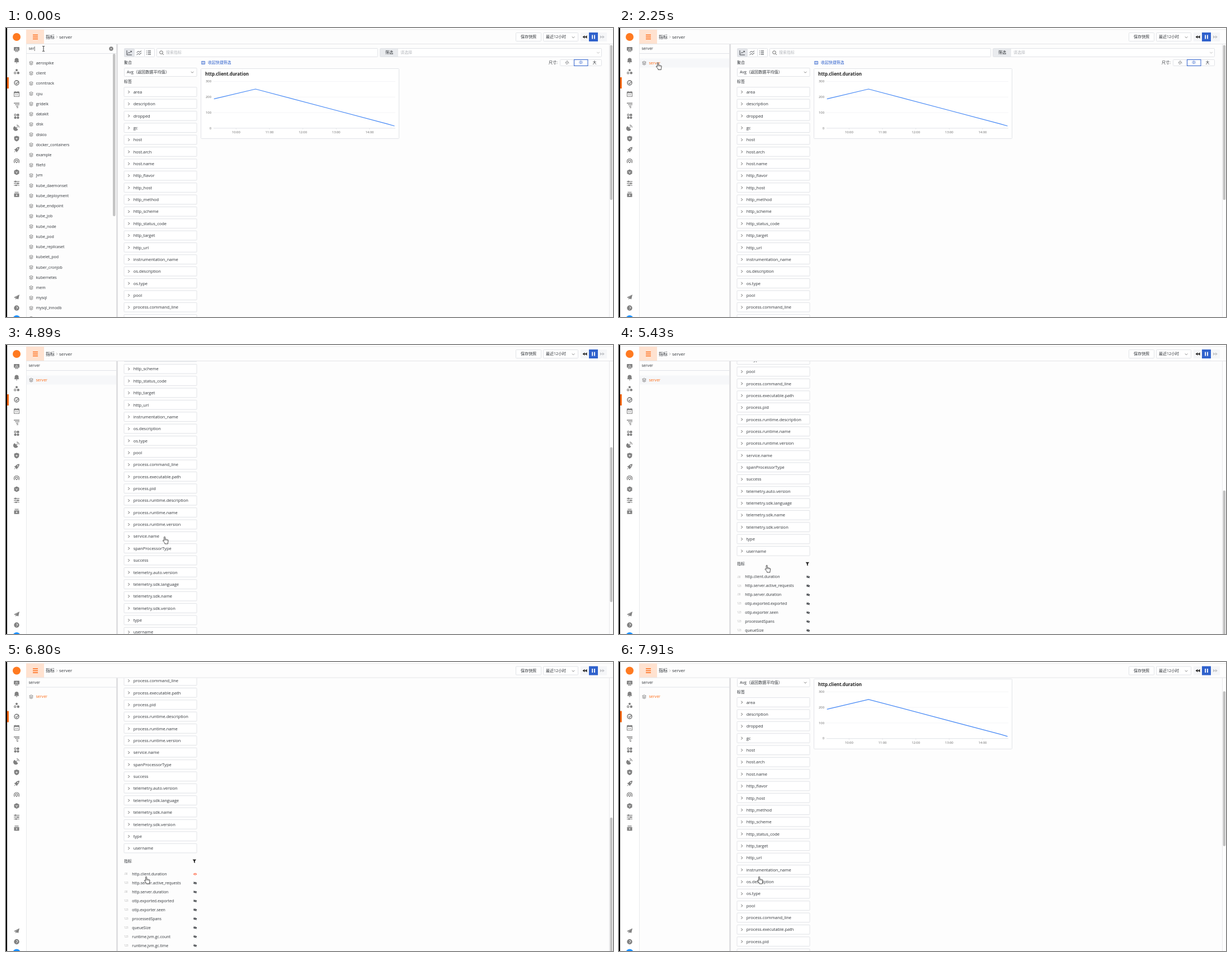
These frames come from a looping animation (1085 by 516 pixels, 8000 ms). An HTML page:

```html
<!DOCTYPE html>
<html lang="zh">
<head>
<meta charset="utf-8">
<title>Metrics explorer</title>
<style>
html, body { margin: 0; width: 100%; height: 100%; overflow: hidden; background: #fff; }
svg { display: block; width: 100vw; height: 100vh; font-family: "Open Sans", "Noto Sans CJK SC", "Noto Sans CJK", sans-serif; }
text { white-space: pre; }
</style>
</head>
<body>
<svg id="stage" viewBox="0 0 1085 516" xmlns="http://www.w3.org/2000/svg"></svg>
<script>
const INK = '#2f3338', GREY = '#808080', PALE = '#b4b7bc', LINE = '#e1e3e7', BLUE = '#2f61cc', ORANGE = '#ff6a13';
const LOOP = 8000;

// Shape helpers; text is placed by its vertical centre.
const text = (x, y, s, size = 7, fill = INK, extra = '') =>
  `<text x="${x}" y="${y + size * .35}" font-size="${size}" fill="${fill}" ${extra}>${s}</text>`;
const rect = (x, y, w, h, fill, extra = '') =>
  `<rect x="${x}" y="${y}" width="${w}" height="${h}" fill="${fill}" ${extra}/>`;
const box = (x, y, w, h, fill = '#fff', stroke = LINE) => rect(x, y, w, h, fill, `stroke="${stroke}" rx="1"`);
const path = (d, stroke = INK, width = 1, fill = 'none') =>
  `<path d="${d}" stroke="${stroke}" stroke-width="${width}" fill="${fill}"/>`;
const solid = (d, fill = GREY) => path(d, 'none', 0, fill);
const dot = (x, y, r, fill = GREY, extra = '') => `<circle cx="${x}" cy="${y}" r="${r}" fill="${fill}" ${extra}/>`;
const ring = (x, y, r, width = 1.2) => dot(x, y, r, 'none', `stroke="${GREY}" stroke-width="${width}"`);
const at = (x, y, body) => `<g transform="translate(${x} ${y})">${body}</g>`;
const group = (id, body, extra = '') => `<g id="${id}" ${extra}>${body}</g>`;
const down = (x, y, color = '#666') => path(`M${x - 2.3} ${y - 1.1}l2.3 2.3 2.3-2.3`, color, .8);

const measurements = ['aerospike', 'client', 'conntrack', 'cpu', 'gridelk', 'datakit', 'disk', 'diskio',
  'docker_containers', 'example', 'filefd', 'jvm', 'kube_daemonset', 'kube_deployment', 'kube_endpoint',
  'kube_job', 'kube_node', 'kube_pod', 'kube_replicaset', 'kubelet_pod', 'kuber_cronjob', 'kubernetes',
  'mem', 'mysql', 'mysql_innodb', 'mysql_schema'];
const tags = ['area', 'description', 'dropped', 'gc', 'host', 'host.arch', 'host.name', 'http_flavor',
  'http_host', 'http_method', 'http_scheme', 'http_status_code', 'http_target', 'http_url',
  'instrumentation_name', 'os.description', 'os.type', 'pool', 'process.command_line',
  'process.executable.path', 'process.pid', 'process.runtime.description', 'process.runtime.name',
  'process.runtime.version', 'service.name', 'spanProcessorType', 'success', 'telemetry.auto.version',
  'telemetry.sdk.language', 'telemetry.sdk.name', 'telemetry.sdk.version', 'type', 'username'];
const metrics = ['http.client.duration', 'http.server.active_requests', 'http.server.duration',
  'otlp.exported.exported', 'otlp.exporter.seen', 'processedSpans', 'queueSize', 'runtime.jvm.gc.count',
  'runtime.jvm.gc.time'];

const navIcons = [
  rect(-5, -4, 10, 6.5, GREY, 'rx=".8"') + rect(-3, 3.3, 6, 1.2, GREY) + path('M-2 1v-2M0 1v-3.5M2 1v-2', '#fff', .8),
  solid('M-4.5 3c1-1 1-2 1-4a3.5 3.5 0 0 1 7 0c0 2 0 3 1 4zM-1.5 3.7h3a1.5 1.3 0 0 1-3 0z'),
  dot(0, -2.7, 2) + ring(-2.8, 2.4, 1.6) + dot(2.8, 2.4, 2.2),
  ring(0, 0, 4, 1.6) + path('M-2 0l1.8 1.6L4 -3', GREY, 1.4),
  rect(-4.5, -3.5, 9, 8, 'none', `stroke="${GREY}"`) + rect(-4.5, -4, 9, 2.6, GREY) +
    path('M-2.5-5v2M2.5-5v2', GREY) + path('M-2.5 1.3h2M.5 1.3h2', GREY, 1.2),
  path('M-5-3.5h10M-3-.8h8M-1 1.9h4M0 4.3h3', GREY, 1.3),
  ring(-2.4, -2.4, 1.6) + dot(2.4, -2.4, 2.2) + dot(-2.4, 2.4, 2.2) + dot(2.4, 2.4, 2.2),
  solid('M-3.5-2.5a4.5 4.5 0 1 0 6 6z') + path('M-.5.5l2.5-2.5M0-4.3a4.3 4.3 0 0 1 4.3 4.3', GREY, 1.2),
  solid('M0-5l4.4 1.4v4Q4 3.5 0 5Q-4 3.5-4.4.4v-4z') + path('M0-1.8v3.6M-1.8 0h3.6', '#fff', .8),
  solid('M5-5Q0-4.7-2.3-1.2L-4.6-.6-3 .8-.8 3 .6 4.6 1.4 2.2Q4.8 0 5-5zM-3 2l1 1-2.6 1.8z') + dot(1.9, -1.9, 1, '#fff'),
  path('M-3.6 3.5a4.6 4.6 0 1 1 7.2 0M-1.8 2.2a2.3 2.3 0 1 1 3.6 0', GREY, 1.3) + dot(0, 2.5, 1.2),
  solid('M0-5l4.5 2.4v5.2L0 5l-4.5-2.4v-5.2z') + path('M-2.2-1L0 .2 2.2-1M0 .2v2.5', '#fff', .8),
  path('M-5-3.3h10M-5 0h10M-5 3.3h10', GREY, 1.1) + dot(-2, -3.3, 1.5) + dot(2.2, 0, 1.5) + dot(-1, 3.3, 1.5),
  rect(-4.5, -2.2, 9, 6.7, GREY, 'rx=".7"') + path('M-3.5-4h7', GREY, 1.3) + path('M0-.3v3M-1.5 1.2h3', '#fff', .9)
];
const layers = y => at(45, y, path('M-3.3-1.6L0-3.2 3.3-1.6 0 0zM-3.3.2L0 1.8 3.3.2M-3.3 1.9L0 3.5 3.3 1.9', '#666', .7));

function navigation() {
  return rect(2, 3, 34, 513, '#fff') + dot(19, 16, 7, '#ff7a21') +
    navIcons.map((icon, i) => at(19, 38 + i * 19.95, icon)).join('') +
    at(19, 480.5, solid('M-5 .5L5-4.5 3 4 0 2.5-1.5 4.5-2 1.5 3-2.5-2.8 1.4z')) +
    dot(19, 500, 4.7) + path('M18.2 502.5l2.3-2.3v-2h-2.3', '#fff', .9) + dot(19, 520, 7, '#1890ff') +
    rect(2, 88, 3, 20, ORANGE) + path('M36.5 3V517', '#e9eaed');
}

function header() {
  const rewind = 'M0-2.7v5.4L-4 0zM4-2.7v5.4L0 0z';
  return rect(36, 3, 32, 25.5, '#ffe2d0') + path('M48 12.5h9M48 16h9M48 19.5h9', ORANGE, 1.3) +
    text(71, 16, '指标', 8) + path('M90 14l2 2-2 2', '#999', .7) + text(95, 16, 'server', 8) +
    box(911.5, 8.5, 45, 15) + text(920, 16, '保存快照') +
    box(960.5, 8.5, 62, 15) + text(965, 16, '最近12小时') + down(1014, 16.5) +
    rect(1027, 8, 47, 16, '#f5f6f8') + rect(1042, 8, 16, 16, BLUE) +
    path('M1048.2 12.5v7M1052 12.5v7', '#fff', 1.8) +
    at(1034.5, 16, solid(rewind, '#222')) + at(1066, 16, `<g transform="scale(-1 1)">${solid(rewind, '#c3c5c9')}</g>`) +
    path('M36 28.5H1085', '#e4e5e8');
}

function sidebar() {
  return path('M36 45.5H197', LINE) +
    group('query', `<text id="typed" x="40.5" y="39.4" font-size="7" fill="${INK}"></text>` +
      rect(0, 33, .7, 8, '#333', 'id="caret"')) +
    group('clear', dot(188, 37, 3.7, '#7f7f7f') + path('M186.6 35.6l2.8 2.8m0-2.8l-2.8 2.8', '#fff', .7)) +
    group('full', measurements.map((name, i) => {
      const y = 62.5 + i * 18.23;
      return layers(y) + text(53.7, y, name);
    }).join('') + rect(191, 46, 4.5, 290, '#c4c4c4', 'rx="2"')) +
    group('filtered', rect(37, 54.5, 160, 16, '#f6f7f9', 'id="rowShade"') + layers(62.5) +
      text(53.5, 62.5, 'server', 7, ORANGE)) +
    rect(197, 29, 3, 488, '#e0e0e2');
}

function toolbar() {
  return box(211.5, 36.5, 18, 15, '#e3e5e9') + box(229.5, 36.5, 18, 15) + box(247.5, 36.5, 18, 15) +
    path('M216 40v8h9M217.5 45.5l2-2 1.5 1 3-3M222.3 41.3h2v2', INK, .9) +
    path('M233.5 44l3-2.5 2 1.8 3.5-2.5M233.5 48l3-2.5 2 1.8 3.5-3', INK, .9) +
    path('M253.5 41h5.5M253.5 44h5.5M253.5 47h5.5M251 41h1M251 44h1M251 47h1', INK, 1) +
    box(269.5, 36.5, 395, 15) + dot(277.5, 43.6, 2.8, 'none', 'stroke="#555" stroke-width=".9"') +
    path('M279.6 45.7l2.4 2.4', '#555', .9) + text(286, 44, '搜索指标', 7, PALE) +
    box(668.5, 36.5, 396, 15) + rect(669, 37, 32, 14, '#e9ebee') + text(678, 44, '筛选') +
    text(705, 44, '请选择', 7, PALE) + down(1058.5, 44, '#aaa') +
    text(211, 62, '聚合') + box(211.5, 71.5, 129.5, 15) +
    text(216, 79, 'Avg（返回数据平均值）', 7.1) + down(333, 79) + text(211, 96, '标签') +
    path('M349.5 59.5h6v5h-6zM351.7 59.5v5M353 61h1.5M353 63h1.5', BLUE, .8) + text(361, 62, '收起快捷筛选', 6.9, BLUE) +
    text(970, 62, '尺寸:') + box(990.5, 56.5, 74, 11) + rect(1015.5, 56.5, 24.5, 11, '#fff', `stroke="${BLUE}"`) +
    text(999.5, 62, '小') + text(1024, 62, '中', 7, BLUE) + text(1048.5, 62, '大');
}

function chart() {
  const grid = [300, 200, 100, 0].map((value, i) => {
    const y = 95.5 + i * 27.8;
    return path(`M371 ${y}H696`, value ? '#f3f4f6' : '#dcdfe4', .9) +
      text(367, y - .3, value, 5.8, '#666', 'text-anchor="end"');
  }).join('');
  const hours = [10, 11, 12, 13, 14].map((hour, i) => {
    const x = 411.3 + i * 59.65;
    return path(`M${x} 179v2`, '#dcdfe4', .8) + text(x, 186, hour + ':00', 5.8, '#666', 'text-anchor="middle"');
  }).join('');
  return group('chartFrame', box(348.5, 72.5, 354, 125)) +
    group('chartBody', text(356, 82, 'http.client.duration', 7.9, '#222', 'font-weight="700"') + grid + hours +
      path('M371.7 126.6L446 109 590 147 682 171.3 694.5 175', '#4286f5', 1.2));
}

function tagList() {
  return tags.map((name, i) => {
    const y = 114.2 + i * 21.36;
    return box(211, y - 8.4, 130, 16.6) + path(`M218.4 ${y - 2.3}l2.3 2.3-2.3 2.3`, '#444', .9) + text(227.7, y, name, 7.5);
  }).join('');
}

function metricList() {
  const eye = 'M-3.2 0Q0-3.8 3.2 0Q0 3.8-3.2 0z';
  return text(211, 820.6, '指标') + solid('M333.6 817.6h6.4l-2.3 3v3.4l-1.8-1v-2.4z', '#222') +
    metrics.map((name, i) => {
      const y = 843.8 + i * 15.95;
      const hidden = solid(eye, INK) + dot(0, 0, 1, '#fff') + path('M-2.6-2.4L2.6 2.4', INK, .8);
      const shown = solid(eye, '#ff6a4a') + dot(0, 0, 1, '#fff');
      return text(211, y, name.endsWith('duration') ? '.00' : '123', 4.4, '#aaa') + text(225.3, y, name, 6.95) +
        at(338, y, i ? hidden : group('eyeOff', hidden) + group('eyeOn', shown));
    }).join('');
}

function pointers() {
  const hand = 'M-1 .8Q0-.6 1 .8V5l1-.4 1 .6 1-.2.9.8.9 0Q6.7 6 6.6 7.2L5.8 11V13H.4V11.6L-3 7.6Q-3.2 6.2-1.6 6.8L-1 7.4z';
  return group('hand', path(hand, '#222', .8, '#fff') + path('M1 5v2.4M3 5.4v2M4.9 6v1.6', '#222', .6)) +
    group('arrow', path('M0 0V8.6L2 6.8 3.5 10.2 4.9 9.6 3.4 6.3H6.1z', '#222', .8, '#fff')) +
    group('ibeam', path('M-2-4.5h1.3L0-4 .7-4.5H2M-2 4.5h1.3L0 4 .7 4.5H2M0-4V4', '#222', .9));
}

document.getElementById('stage').innerHTML =
  '<defs><clipPath id="view"><rect x="201" y="29" width="877" height="488"/></clipPath></defs>' +
  rect(0, 0, 1085, 516, '#fdfdfd') + rect(0, 0, 1085, 2.5, '#fff') + path('M2 2.8H1085', '#e2e3e5', .8) +
  group('page', navigation() + sidebar() +
    `<g clip-path="url(#view)">${group('content', toolbar() + chart() + tagList() + metricList())}</g>` +
    path('M1078.5 29V517', '#e8e8ea') + rect(1079.7, 0, 4.3, 276.5, '#c1c1c1', 'id="thumb" rx="2"') + header()) +
  rect(0, 0, 2, 516, '#000') + group('pointer', pointers());

const el = {};
document.querySelectorAll('[id]').forEach(node => el[node.id] = node);
const show = (name, on) => el[name].setAttribute('display', on ? 'inline' : 'none');
const move = (name, x, y) => el[name].setAttribute('transform', `translate(${x} ${y})`);

const bursts = [[0, 0, 1], [150, 150, 1], [430, 430, 1], [990, 990, 1], [1430, 1570, 2], [1850, 2250, 4], [2530, 3360, 7],
  [3790, 4090, 3], [4210, 4750, 5], [4890, 5700, 7], [5950, 6520, 5], [6800, 6800, 1], [7520, 7910, 4]];
const ticks = bursts.flatMap(([first, last, n]) =>
  Array.from({ length: n }, (_, i) => n > 1 ? first + (last - first) * i / (n - 1) : first));

const pointerKeys = [[0, 67, 37], [1570, 67, 37], [2250, 69.5, 61.5], [2530, 71, 61], [3360, 86, 55],
  [3790, 125, 60], [4090, 262, 94], [4480, 275, 210], [4890, 283.5, 342], [5700, 254.5, 418.5],
  [5950, 254, 414], [6520, 250.5, 383], [LOOP, 250.5, 383]];
const scrollKeys = [[0, 0], [4350, 0], [4890, 285], [5560, 464.6], [7400, 464.6], [7910, 41.7], [LOOP, 41.7]];

function sample(keys, t, column = 1) {
  const i = Math.max(1, keys.findIndex(key => key[0] >= t));
  const a = keys[i - 1], b = keys[i];
  return a[column] + (b[column] - a[column]) * (t - a[0]) / (b[0] - a[0]);
}

function draw(now) {
  const t = ticks.filter(tick => tick <= now + .01).pop();
  const between = (a, b) => t >= a && t < b;

  const typed = t < 150 ? 'ser' : t < 430 ? 'serv' : 'server';
  el.typed.textContent = typed;
  el.caret.setAttribute('x', 40.6 + el.typed.getComputedTextLength());
  show('caret', t < 990 || between(1430, 1850));
  show('full', t < 1570);
  show('filtered', t >= 1570);
  show('clear', t < 1980);

  const settled = t >= 5950;
  move('page', 0, settled ? -.5 : 0);
  show('rowShade', !settled);

  show('chartBody', t < 2800 || t >= 6800);
  show('chartFrame', t < 3790 || t >= 6800);
  show('eyeOff', t < 6800);
  show('eyeOn', t >= 6800);

  const scroll = sample(scrollKeys, t);
  move('content', 0, -scroll);
  el.thumb.setAttribute('y', 30.5 + scroll * .5335);

  move('pointer', sample(pointerKeys, t, 1), sample(pointerKeys, t, 2));
  const ibeam = t < 1900, arrow = between(3790, 4210);
  show('ibeam', ibeam);
  show('arrow', arrow);
  show('hand', !ibeam && !arrow);
}

const start = performance.now();
function loop() {
  draw((performance.now() - start) % LOOP);
  requestAnimationFrame(loop);
}
loop();
</script>
</body>
</html>
```
